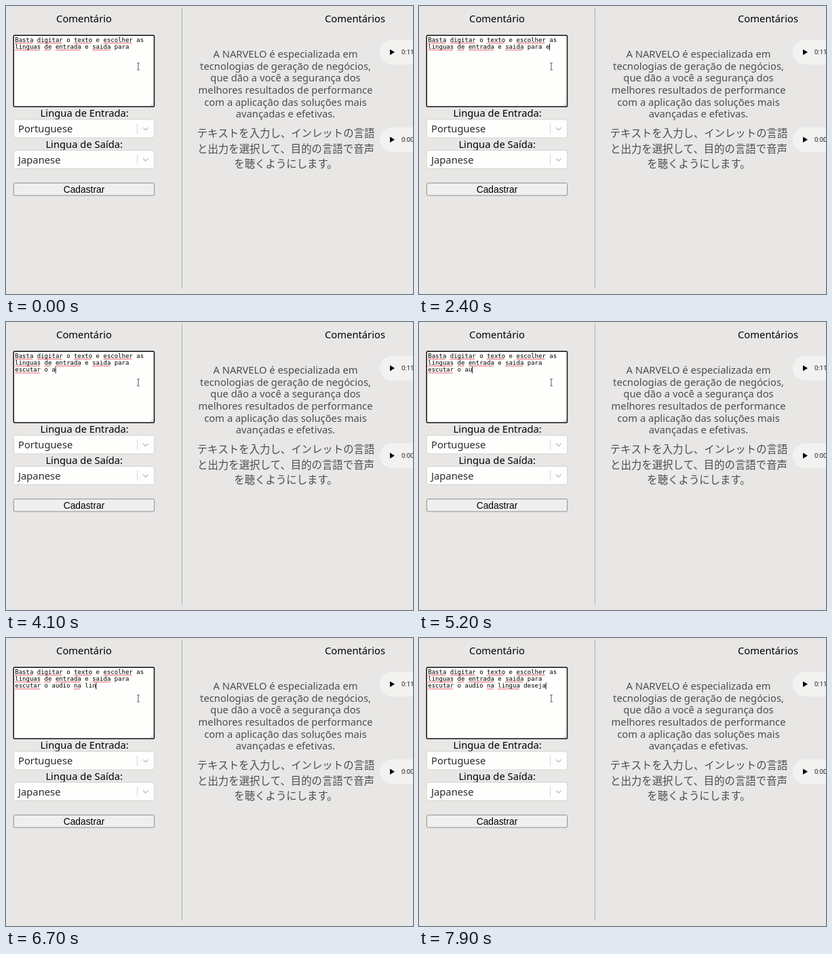
Recreate the animation shown at these times as an HTML page with a canvas. Size 600 px wide and 424 px high, loop 8 s.

```html
<!DOCTYPE html>
<html lang="pt">
<head>
<meta charset="utf-8">
<title>Comentários</title>
<style>
html, body { margin: 0; width: 100%; height: 100%; overflow: hidden; background: #e8e7e6; }
canvas { display: block; width: 600px; height: 424px; }
</style>
</head>
<body>
<canvas id="stage"></canvas>
<script>
const W = 600, H = 424, LOOP = 8000, BLINK = 600;
const canvas = document.getElementById('stage');
const ctx = canvas.getContext('2d');
const dpr = window.devicePixelRatio || 1;
canvas.width = W * dpr;
canvas.height = H * dpr;

const UI = '14.75px "Noto Sans", "Open Sans", sans-serif';
const JP = '15.4px "Noto Sans CJK JP", "Noto Sans CJK", sans-serif';
const MONO = '9.03px "DejaVu Sans Mono", monospace';
const BUTTON = '13.8px "Liberation Sans", Arial, sans-serif';
const TIME = '9.5px Roboto, sans-serif';
const PAPER = '#fefefd', INK = '#000', SOFT = '#4c4c4c';

const TEXT = 'Basta digitar o texto e escolher as linguas de entrada e saida para ';
const COLUMNS = 37;
const MISSPELT = /\b(Basta|digitar|texto|escolher|linguas|de|entrada|saida|escutar|na|lingua)(?= )/g;

// Bursts of even typing with pauses between them.
const BURSTS = [
  { start: 1200, gap: 100, keys: 'e' },
  { start: 2500, gap: 133, keys: 'scut' },
  { start: 3100, gap: 100, keys: 'ar ' },
  { start: 3800, gap: 150, keys: 'o a' },
  { start: 5200, gap: 180, keys: 'udio n' },
  { start: 6300, gap: 87, keys: 'a lingua ' },
  { start: 7300, gap: 120, keys: 'deseja' }
];

function typing(t) {
  let typed = '', last = -BLINK;
  for (const { start, gap, keys } of BURSTS) {
    if (t < start) break;
    const count = Math.min(keys.length, Math.floor((t - start) / gap) + 1);
    typed += keys.slice(0, count);
    last = start + (count - 1) * gap;
  }
  return { typed, caret: Math.floor((t - last) / BLINK) % 2 === 0 };
}

// Breaks at the last space that fits; trailing spaces stay on their row.
function wrap(str) {
  const rows = [''];
  for (const word of str.match(/\S+ ?/g)) {
    const row = rows.at(-1);
    if (row.length + word.trimEnd().length > COLUMNS) rows.push(word);
    else rows[rows.length - 1] = row + word;
  }
  return rows;
}

function text(str, x, y, font, color = INK, align = 'center') {
  ctx.font = font;
  ctx.fillStyle = color;
  ctx.textAlign = align;
  ctx.fillText(str, x, y);
}

function paragraph(lines, x, y, pitch, font) {
  lines.forEach((line, i) => text(line, x, y + i * pitch, font, SOFT));
}

function box(x, y, w, h, r, fill, stroke, line = 1) {
  ctx.beginPath();
  ctx.roundRect(x, y, w, h, r);
  ctx.fillStyle = fill;
  ctx.fill();
  if (!stroke) return;
  ctx.strokeStyle = stroke;
  ctx.lineWidth = line;
  ctx.stroke();
}

function path(points, color, width) {
  ctx.beginPath();
  points.forEach(([x, y]) => ctx.lineTo(x, y));
  ctx.strokeStyle = color;
  ctx.lineWidth = width;
  ctx.stroke();
}

function select(label, y) {
  box(11.3, y, 207.4, 27, 2.7, PAPER, '#ccc', 0.8);
  text(label, 18, y + 19, UI, '#2c2c2c', 'left');
  path([[193.5, y + 6], [193.5, y + 21]], '#ccc', 0.8);
  path([[202, y + 12], [205.8, y + 15.6], [209.6, y + 12]], '#c4c4c4', 1.5);
}

function player(y, time) {
  box(551, y, 204, 36.5, 18.25, '#f2f2f1');
  ctx.beginPath();
  ctx.moveTo(566, y + 14);
  ctx.lineTo(573, y + 18.2);
  ctx.lineTo(566, y + 22.4);
  ctx.fillStyle = INK;
  ctx.fill();
  text(time, 583, y + 21.6, TIME, '#222', 'left');
}

function squiggle(x, y, w) {
  const points = [];
  for (let i = 0; i * 1.36 <= w; i++) points.push([x + i * 1.36, y + (i % 2 ? 0.4 : -0.4)]);
  path(points, '#e8404a', 0.9);
}

function editor(t) {
  const { typed, caret } = typing(t);
  const rows = wrap(TEXT + typed);
  const left = 13.2, top = 53, pitch = 10.2;
  ctx.font = MONO;
  const step = ctx.measureText('0').width;
  rows.forEach((row, i) => {
    const y = top + i * pitch;
    for (const m of row.matchAll(MISSPELT)) {
      squiggle(left + m.index * step, y + 1.6, m[0].length * step);
    }
    text(row, left, y, MONO, INK, 'left');
  });
  if (caret) {
    const end = rows.length - 1;
    ctx.fillRect(left + rows[end].length * step - 0.2, top - 7.8 + end * pitch, 0.9, 10);
  }
}

function pointer(x, y) {
  path([[x, y - 5], [x, y + 5]], '#444', 0.9);
  for (const end of [y - 5, y + 5]) path([[x - 2, end], [x + 2, end]], '#444', 0.8);
}

function form(t) {
  text('Comentário', 115, 24, UI);
  box(11.2, 43.3, 207.3, 105, 1.5, PAPER, '#111', 1.5);
  for (const d of [1.7, 4]) path([[217.3 - d, 147], [217.3, 147 - d]], '#888', 0.6);
  editor(t);
  pointer(195, 89);

  text('Lingua de Entrada:', 115.7, 163, UI);
  select('Portuguese', 167);
  text('Lingua de Saída:', 115.2, 208.5, UI);
  select('Japanese', 212.5);
  box(11.4, 260.6, 207.2, 18.4, 2, '#efefef', '#767676', 0.8);
  text('Cadastrar', 115, 274.5, BUTTON);
}

function comments() {
  text('Comentários', 514.5, 24, UI);
  paragraph([
    'A NARVELO é especializada em',
    'tecnologias de geração de negócios,',
    'que dão a você a segurança dos',
    'melhores resultados de performance',
    'com a aplicação das soluções mais',
    'avançadas e efetivas.'
  ], 412, 76, 17.65, UI);
  paragraph([
    'テキストを入力し、インレットの言語',
    'と出力を選択して、目的の言語で音声',
    'を聴くようにします。'
  ], 412.5, 193.2, 22.4, JP);
  player(49.8, '0:11');
  player(178.6, '0:00');
}

function draw(t) {
  ctx.setTransform(dpr, 0, 0, dpr, 0, 0);
  ctx.fillStyle = '#e8e7e6';
  ctx.fillRect(0, 0, W, H);
  path([[259.5, 2], [259.5, 416]], '#adadad', 1);
  form(t);
  comments();
}

const start = performance.now();
function frame() {
  draw((performance.now() - start) % LOOP);
  requestAnimationFrame(frame);
}
frame();
</script>
</body>
</html>
```
